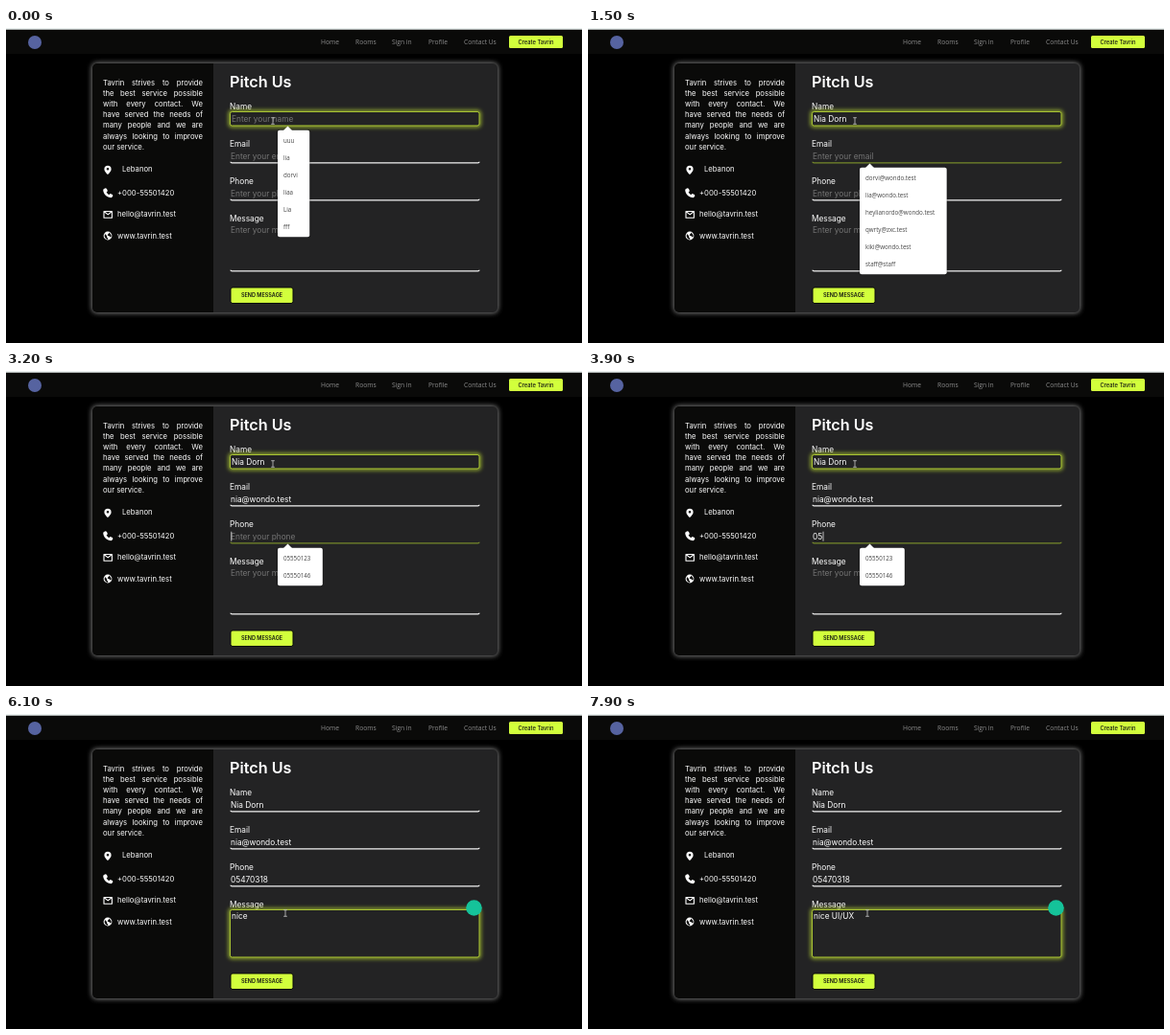
An HTML page for the animation above (8 s loop, 600 by 329 pixels).

```html
<!DOCTYPE html>
<html lang="en">
<head>
<meta charset="utf-8">
<title>Contact form</title>
<style>
  html, body { margin: 0; width: 100%; height: 100%; overflow: hidden; background: #000; }
  svg { position: absolute; left: 0; top: 0; }
  text { white-space: pre; font: 8.3px Inter, sans-serif; fill: #fff; }
  .nav { font: 6.7px "Open Sans", sans-serif; fill: #8d8d8d; }
  .item { font: 6.2px "Open Sans", sans-serif; fill: #444; }
  .side { font-size: 7.7px; }
  .hint { fill: #757575; }
  .button { font-weight: 500; font-size: 5.8px; fill: #111; text-anchor: middle; }
  #about { position: absolute; left: 101px; top: 51.5px; width: 104px; color: #fff;
    font: 7.7px/11.2px Inter, sans-serif; white-space: nowrap; }
  #about div { text-align: justify; text-align-last: justify; }
  #about div:last-child { text-align-last: left; }
</style>
</head>
<body>
<svg width="600" height="329" viewBox="0 0 600 329">
  <defs>
    <filter id="halo" x="-10%" y="-10%" width="120%" height="120%"><feGaussianBlur stdDeviation="2.6"/></filter>
    <filter id="glow" filterUnits="userSpaceOnUse" x="215" y="70" width="300" height="210"><feGaussianBlur stdDeviation="2"/></filter>
    <filter id="soft" x="-20%" y="-20%" width="140%" height="140%"><feGaussianBlur stdDeviation="1.2"/></filter>
  </defs>
  <rect width="600" height="27" fill="#0a0a09"/>
  <rect width="600" height="1.7" fill="#e9efee"/>
  <circle cx="30" cy="15" r="7" fill="#5663a0"/>
  <g id="nav"></g>
  <rect x="524" y="8" width="56" height="13" rx="1.5" fill="#d2ff3c"/>
  <text class="button" x="552" y="16.8">Create Tavrin</text>

  <rect x="89" y="36" width="424" height="262" rx="6" fill="#777" filter="url(#halo)"/>
  <rect x="90" y="37" width="422" height="260" rx="5" fill="#232324"/>
  <path d="M216 37H95a5 5 0 0 0-5 5V292a5 5 0 0 0 5 5H216z" fill="#0a0a09"/>

  <g fill="#fff">
    <path d="M106 143.8a3.6 3.6 0 0 0-3.6 3.6c0 2.4 3.6 5.6 3.6 5.6s3.6-3.2 3.6-5.6a3.6 3.6 0 0 0-3.6-3.6zm0 2.2a1.3 1.3 0 1 1 0 2.6a1.3 1.3 0 0 1 0-2.6z"/>
    <path d="M103.2 167.3l1.7.4 1 2.6-1.3 1.2a8 8 0 0 0 2.7 2.8l1.3-1.3 2.4 1 .3 1.8-1.6 1.5c-4.5 0-8.5-4-8.5-8.5z"/>
    <path d="M102 191.5h8.4v6.8H102zl4.2 3.4 4.2-3.4" fill="none" stroke="#fff" stroke-width="1.1" stroke-linejoin="round"/>
    <circle cx="106" cy="217" r="4.4"/>
    <path d="M103 215l2 2v1.4l1.2 1.2v1.4l-2-.8-1.6-2.4zM107 213.6l2 1.6.8 2-.8 1.6-1.4-1.6-1.8-.4.2-1.4 1-.5z" fill="#0a0a09"/>
  </g>
  <text class="side" x="121" y="149.8">Lebanon</text>
  <text class="side" x="116" y="174.6">+000-55501420</text>
  <text class="side" x="116" y="197.2">hello@tavrin.test</text>
  <text class="side" x="116" y="219.6">www.tavrin.test</text>

  <text x="233" y="62" style="font-size:16.2px;font-weight:600">Pitch Us</text>
  <rect x="234" y="271" width="65" height="16.5" rx="2" fill="#d2ff3c" stroke="#080808"/>
  <text class="button" x="266.5" y="281.2" style="font-weight:600;font-size:5.5px">SEND MESSAGE</text>
  <g id="form"></g>
</svg>
<div id="about">
  <div>Tavrin strives to provide</div>
  <div>the best service possible</div>
  <div>with every contact. We</div>
  <div>have served the needs of</div>
  <div>many people and we are</div>
  <div>always looking to improve</div>
  <div>our service.</div>
</div>
<script>
const LOOP = 8000, STEP = 100;
const form = document.getElementById('form');
const pen = document.createElement('canvas').getContext('2d');

// typing: [text, time of first key, time between keys]
const fields = [
  { label: 'Name', y: 82, line: 102, focus: -500, typing: [['Nia Dorn', 100, 100]],
    items: ['uuu', 'lia', 'dorvi', 'liaa', 'Lia', 'fff'] },
  { label: 'Email', y: 121, line: 141, focus: 1000, typing: [['nia@wondo.test', 1700, 75]],
    items: ['dorvi@wondo.test', 'lia@wondo.test', 'heylianordo@wondo.test', 'qwrty@zxc.test',
      'kiki@wondo.test', 'staff@staff', 'nia@wondo.test'] },
  { label: 'Phone', y: 160, line: 180, focus: 3100,
    typing: [['05', 3600, 200], ['470318', 4000, 100]], items: ['05550123', '05550146'] },
  { label: 'Message', y: 199, line: 254, focus: 5300,
    typing: [['nice', 5400, 65], [' UI/UX', 6400, 200]], items: [] }
];

// pointer path: [time, x, y]
const path = [[0, 278, 97], [4600, 278, 97], [5000, 290, 181], [5200, 291, 208], [LOOP, 291, 208]];

const text = (x, y, s, cls = '') => `<text x="${x}" y="${y}" class="${cls}">${s}</text>`;

function width(s, font) {
  pen.font = font;
  return pen.measureText(s).width;
}

function pointer(t) {
  const i = path.findIndex(p => p[0] > t);
  const [a, b] = [path[i - 1], path[i]];
  const k = (t - a[0]) / (b[0] - a[0]);
  return [a[1] + (b[1] - a[1]) * k, a[2] + (b[2] - a[2]) * k];
}

function typed(field, t) {
  let value = '', last = field.focus;
  for (const [s, start, gap] of field.typing) {
    if (t < start) break;
    const n = Math.min(s.length, Math.floor((t - start) / gap) + 1);
    value += s.slice(0, n);
    last = start + (n - 1) * gap;
  }
  return { value, last };
}

function input(f, t, mouseY, focused) {
  const { value, last } = typed(f, t);
  const hover = mouseY >= f.y + 4 && mouseY <= f.line + 2;
  const top = f.y + 5.5, x = hover ? 235 : 234;
  const base = f.y + (f.label === 'Message' ? 15 : 15.5) + (hover && f.label !== 'Message' ? .4 : 0);
  let out = text(233, f.y + 2.8, f.label);
  if (hover) {
    const box = `x="233.5" y="${top}" width="259.5" height="${f.line - top}" rx="2"`;
    out += `<rect ${box} fill="none" stroke="#b6d432" stroke-width="3" filter="url(#glow)"/>
      <rect ${box} fill="#232324" stroke="#a9c433"/>`;
  } else {
    out += `<path d="M234 ${f.line - 1.2}q0 1 1.5 1H491.500q1.500 0 1.500-1" fill="none"
      stroke="${focused ? '#76892a' : '#f2f2f2'}" stroke-width="1.3"/>`;
  }
  out += value ? text(x, base, value)
    : text(x, base, 'Enter your ' + f.label.toLowerCase(), 'hint');
  if (focused && (t - last) % 1000 < 500) {
    const caret = x + .5 + width(value, '8.3px Inter, sans-serif');
    out += `<rect x="${caret}" y="${base - 7.8}" width=".7" height="10" fill="#fff"/>`;
  }
  return out;
}

function dropdown(f, t) {
  const { value } = typed(f, t);
  const items = f.items.filter(s => s.toLowerCase().startsWith(value.toLowerCase())).slice(0, 6);
  if (!items.length) return '';
  const w = 18.5 + Math.max(...items.map(s => width(s, '6.2px "Open Sans", sans-serif')));
  const y = f.line + 4.7;
  const box = `x="283" y="${y}" width="${w}" height="${items.length * 18 + 3.5}" rx="2"`;
  return `<rect ${box} fill="#000" opacity=".4" filter="url(#soft)"/><rect ${box} fill="#fff"/>
    <path d="M289 ${y + .3}l4.500-4.500 4.500 4.500z" fill="#fff"/>`
    + items.map((s, i) => text(289, f.line + 18.2 + i * 18, s, 'item')).join('');
}

function draw(t) {
  const active = fields.filter(f => f.focus <= t).pop();
  const [mx, my] = pointer(t);
  let out = fields.map(f => input(f, t, my, f === active)).join('') + dropdown(active, t);
  if (active.label === 'Message') out += '<circle cx="487.500" cy="202.500" r="8.300" fill="#15c39a"/>';
  out += `<path d="M${mx - 1.8} ${my - 3.3}h3.600m-1.800 0v6.600m-1.800 0h3.600" fill="none" stroke="#c8c8c8" stroke-width=".8"/>`;
  form.innerHTML = out;
}

document.getElementById('nav').innerHTML =
  [[328, 'Home'], [364, 'Rooms'], [402, 'Sign in'], [440, 'Profile'], [477, 'Contact Us']]
    .map(([x, s]) => text(x, 17.3, s, 'nav')).join('');

const begin = performance.now();
let shown = -1;
function tick() {
  const t = Math.floor((performance.now() - begin) % LOOP / STEP) * STEP;
  if (t !== shown) draw(shown = t);
  requestAnimationFrame(tick);
}
tick();
</script>
</body>
</html>
```
